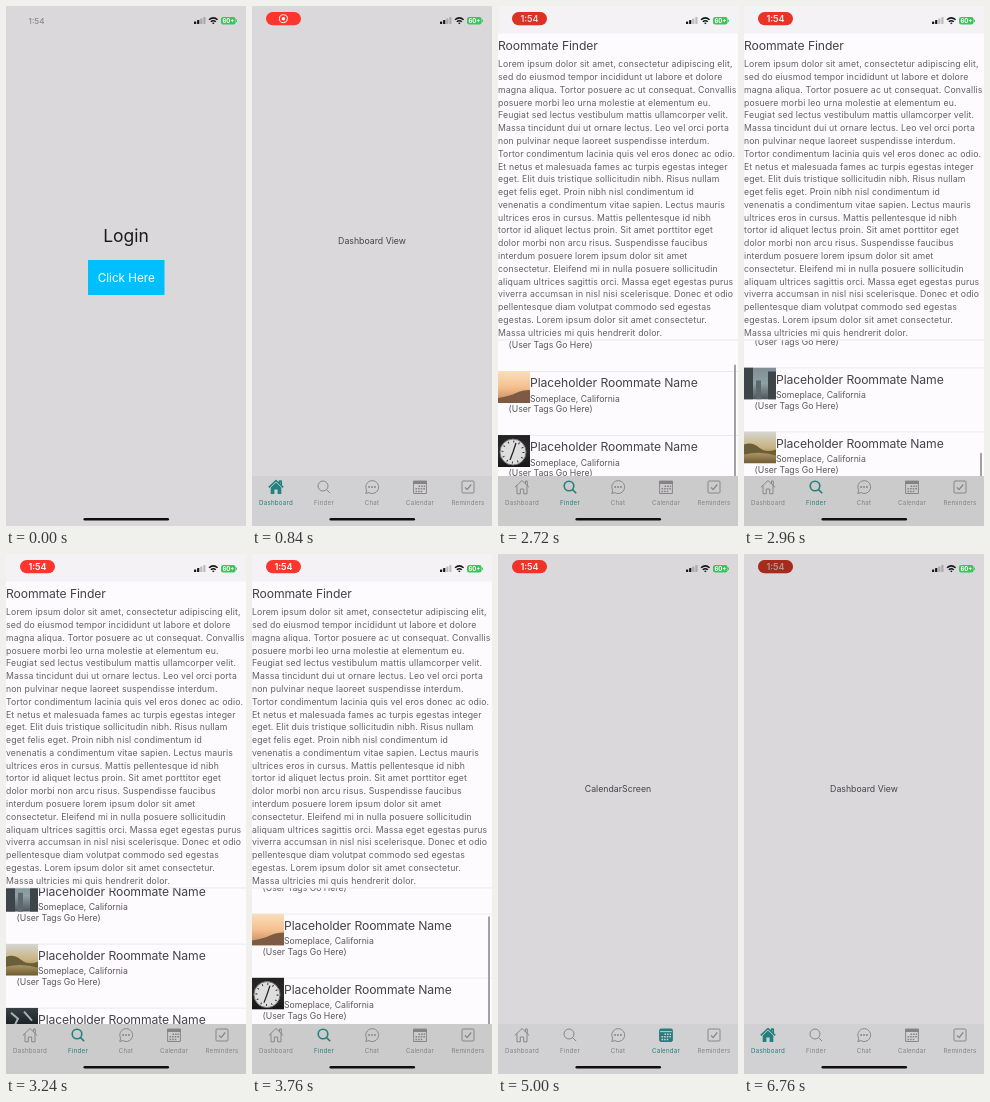
Animation of 240 by 520 pixels, one loop 6800 ms. Source, as an HTML page:

```html
<!DOCTYPE html>
<html lang="en">
<head>
<meta charset="utf-8">
<title>Roommate app</title>
<style>
html, body { margin: 0; width: 100%; height: 100%; overflow: hidden; background: #dad8db; }
svg { display: block; width: 240px; height: 520px; font-family: Inter, Roboto, sans-serif; }
.mid { text-anchor: middle; }
.body { font-size: 8.7px; fill: #59575a; }
.lorem { letter-spacing: .14px; fill: #626063; }
.title { font-size: 12.2px; letter-spacing: -.11px; fill: #454347; }
.view { font-size: 8.75px; fill: #454447; }
.label { font-size: 6.2px; letter-spacing: .22px; stroke: none; fill: currentColor; }
.tab { color: #858386; fill: none; stroke: currentColor; stroke-width: .95; stroke-linejoin: round; }
.tab .solid { fill: currentColor; stroke: none; }
.tab .on { display: none; }
.tab.active { color: #24807e; }
.tab.active .on { display: inline; }
.tab.active .off { display: none; }
</style>
</head>
<body>
<svg viewBox="0 0 240 520">
  <defs>
    <clipPath id="listArea"><rect y="334" width="240" height="136"/></clipPath>
    <clipPath id="thumb"><rect width="32" height="32"/></clipPath>
  </defs>
  <rect id="back" width="240" height="520"/>

  <g id="login">
    <text class="mid" x="120" y="236.3" font-size="17.5" fill="#19181a">Login</text>
    <g id="button">
      <rect x="82" y="254" width="76.5" height="35" fill="#00bfff"/>
      <text class="mid" x="120.3" y="276" font-size="11.7" fill="#fff">Click Here</text>
    </g>
  </g>

  <text id="view" class="mid view" x="120" y="237.7"></text>

  <g id="finder">
    <rect width="240" height="27.5" fill="#f4f2f5"/>
    <text class="title" x="0" y="44">Roommate Finder</text>
    <g id="lorem"></g>
    <g clip-path="url(#listArea)">
      <g id="list"></g>
      <rect id="bar" x="236" width="2" height="150" rx="1" fill="#a3a1a5"/>
    </g>
    <rect y="333.6" width="240" height=".7" fill="#e2dfe4"/>
  </g>

  <g id="tabs"><rect id="tabBack" y="470" width="240" height="50"/></g>

  <text id="clock" class="mid" x="30.5" y="17.5" font-size="8" font-weight="500" fill="#89878a">1:54</text>
  <g id="pill">
    <rect x="14" y="6" width="35" height="13.3" rx="6.6" fill="#fc362c"/>
    <g id="record">
      <circle cx="31.4" cy="12.7" r="4" fill="none" stroke="#fff" stroke-width="1"/>
      <circle cx="31.4" cy="12.7" r="1.8" fill="#fff"/>
    </g>
    <text id="pillTime" class="mid" x="31.5" y="16" font-size="9" font-weight="600" fill="#fff">1:54</text>
    <rect id="shade" x="14" y="6" width="35" height="13.3" rx="6.6" fill="#352008"/>
  </g>
  <g fill="#171618">
    <rect x="188" y="15.4" width="2.2" height="2.6" rx=".5"/>
    <rect x="191.1" y="14" width="2.2" height="4" rx=".5"/>
    <rect x="194.2" y="12.5" width="2.2" height="5.5" rx=".5" opacity=".25"/>
    <rect x="197.3" y="11" width="2.2" height="7" rx=".5" opacity=".25"/>
    <g fill="none" stroke="#171618" stroke-width="1.5">
      <path d="M203 13.8Q207.3 10 211.6 13.8"/>
      <path d="M204.8 15.8Q207.3 13.6 209.8 15.8"/>
    </g>
    <path d="M206 16.9Q207.3 15.9 208.6 16.9L207.3 18.2Z"/>
  </g>
  <rect x="215" y="11" width="14.6" height="7.6" rx="2.3" fill="#35c759"/>
  <rect x="230.1" y="13.4" width=".9" height="2.7" rx=".4" fill="#35c759"/>
  <text class="mid" x="222.4" y="17" font-size="6" font-weight="700" fill="#fff">60+</text>
  <rect x="77.5" y="512" width="85.5" height="2.6" rx="1.3" fill="#100e11"/>
</svg>
<script>
const LOOP = 6800;
const $ = id => document.getElementById(id);
const show = (id, on) => $(id).style.display = on ? "" : "none";
const clamp = x => Math.max(0, Math.min(1, x));
const ramp = (t, from, to) => clamp((t - from) / (to - from));

const lines = `Lorem ipsum dolor sit amet, consectetur adipiscing elit,
sed do eiusmod tempor incididunt ut labore et dolore
magna aliqua. Tortor posuere ac ut consequat. Convallis
posuere morbi leo urna molestie at elementum eu.
Feugiat sed lectus vestibulum mattis ullamcorper velit.
Massa tincidunt dui ut ornare lectus. Leo vel orci porta
non pulvinar neque laoreet suspendisse interdum.
Tortor condimentum lacinia quis vel eros donec ac odio.
Et netus et malesuada fames ac turpis egestas integer
eget. Elit duis tristique sollicitudin nibh. Risus nullam
eget felis eget. Proin nibh nisl condimentum id
venenatis a condimentum vitae sapien. Lectus mauris
ultrices eros in cursus. Mattis pellentesque id nibh
tortor id aliquet lectus proin. Sit amet porttitor eget
dolor morbi non arcu risus. Suspendisse faucibus
interdum posuere lorem ipsum dolor sit amet
consectetur. Eleifend mi in nulla posuere sollicitudin
aliquam ultrices sagittis orci. Massa eget egestas purus
viverra accumsan in nisl nisi scelerisque. Donec et odio
pellentesque diam volutpat commodo sed egestas
egestas. Lorem ipsum dolor sit amet consectetur.
Massa ultricies mi quis hendrerit dolor.`.split("\n");
$("lorem").innerHTML = lines.map((s, i) =>
  `<text class="body lorem" x="0" y="${61.2 + i * 12.79}">${s}</text>`).join("");

// Thumbnails: three gradient colours plus a few flat shapes
const photos = [
  ["#a3abb0", "#c2ab90", "#b8722c", `<path d="M0 15Q16 12 32 15V20H0Z" fill="#6f6a58"/><path d="M4 19h8v5H4zM19 18h6v4h-6z" fill="#7c4a22"/>`],
  ["#f8dfbd", "#f5c08f", "#c08457", `<path d="M0 27Q12 25 18 22T32 19V32H0Z" fill="#7d5a43"/>`],
  ["#222", "#2a2a2a", "#161616", `<circle cx="15" cy="17" r="13" fill="#dedede" stroke="#777"/><circle cx="15" cy="17" r="10.5" fill="none" stroke="#333" stroke-width="2" stroke-dasharray="1 4.5"/><path d="M12 25L15 17L18 8" fill="none" stroke="#222" stroke-width="1.3"/>`],
  ["#7f8d94", "#8fa0a7", "#4d565a", `<path d="M0 0h9v32H0zM24 4h8v28h-8z" fill="#3d4549"/><path d="M12 13h5v19h-5z" fill="#5c686e"/>`],
  ["#d5d6d3", "#c9b37f", "#6d5a30", `<path d="M0 13Q8 10 15 16T32 18V24Q16 19 0 23Z" fill="#6b5e38"/>`],
  ["#3a4146", "#1d2225", "#131617", `<path d="M5 5l7 6-4 8M18 4l8 9" stroke="#a9b2b6" stroke-width="2" fill="none"/>`]
];
$("list").innerHTML = Array.from({ length: 8 }, (_, i) => {
  const [top, mid, low, shapes] = photos[i % photos.length];
  return `<g transform="translate(0 ${334.7 + i * 64})">
    <linearGradient id="sky${i}" x2="0" y2="1"><stop stop-color="${top}"/>
      <stop offset=".5" stop-color="${mid}"/><stop offset="1" stop-color="${low}"/></linearGradient>
    <rect width="240" height=".8" fill="#e8e5ea"/>
    <g clip-path="url(#thumb)"><rect width="32" height="32" fill="url(#sky${i})"/>${shapes}</g>
    <text class="title" x="32" y="16.2">Placeholder Roommate Name</text>
    <text class="body" x="32" y="30.8">Someplace, California</text>
    <text class="body" x="10.5" y="41.4">(User Tags Go Here)</text></g>`;
}).join("");

const dots = (color, r) => [-2.9, 0, 2.9].map(x => `<circle cx="${x}" r="${r}" fill="${color}" stroke="none"/>`).join("");
const days = color => `<path d="M-1.5-.8H5M-4.5 1.8H5M-4.5 4.4H3" stroke="${color}" stroke-width="1.5" stroke-dasharray="1.6 1"/>`;
const roof = `<path d="M-7.2.4L0-6.5L7.2.4M3.5-3.2V-6H5.3V-1.6"/>`;
const bubble = "M-6.2 6.5L-5.3 3.3A6.4 6.4 0 1 1-3 5.6Z";
const box = `x="-6" y="-6" width="12" height="12" rx="1"`;
const check = color => `<path d="M-3 .4L-.9 2.6L3.2-2.5" stroke="${color}" stroke-width="1.2"/>`;
const pair = (off, on) => `<g class="off">${off}</g><g class="on">${on}</g>`;
const tabs = [
  ["Dashboard", pair(`${roof}<path d="M-5-1.6V6.8H-1.7V2H1.7V6.8H5V-1.6"/>`,
    `<g stroke-width="1.5">${roof}</g><path class="solid" d="M-5.3.6L0-4.5L5.3.6V7H1.6V2.6H-1.6V7H-5.3Z"/>`)],
  ["Finder", pair(`<circle cx="-1" cy="-1" r="5"/><path d="M2.6 2.6L6.2 6.2"/>`,
    `<g stroke-width="1.6"><circle cx="-1" cy="-1" r="4.8"/><path d="M2.6 2.6L6.2 6.2"/></g>`)],
  ["Chat", pair(`<path d="${bubble}"/>${dots("currentColor", .95)}`,
    `<path d="${bubble}" fill="currentColor"/>${dots("#cfced0", .95)}`)],
  ["Calendar", pair(`<rect x="-6.4" y="-5.8" width="12.8" height="12.3"/><path class="solid" d="M-6.8-6.2H6.8V-3H-6.8Z"/>${days("currentColor")}`,
    `<rect x="-6.4" y="-6" width="12.8" height="12.5" rx="1.3" fill="currentColor"/><path d="M-5.8-3.4H5.8" stroke="#cfced0"/>${days("#cfced0")}`)],
  ["Reminders", pair(`<rect ${box}/>${check("currentColor")}`,
    `<rect ${box} fill="currentColor"/>${check("#cfced0")}`)]
];
$("tabs").innerHTML += tabs.map(([name, icon], i) =>
  `<g class="tab" transform="translate(${24 + i * 48} 481)">${icon}<text class="label mid" y="17.9">${name}</text></g>`).join("");
const tabNodes = [...document.querySelectorAll(".tab")];

const views = ["Dashboard View", "", "ChatScreen", "CalendarScreen", "RemindersScreen"];
// [start time, tab]; -1 is the login screen
const route = [[0, -1], [760, 0], [1800, 1], [4240, 2], [4760, 3], [5480, 4], [6160, 0]];
const scrollKeys = [[2560, 0], [2640, 10], [2720, 33], [2840, 110], [2960, 165], [3100, 193], [3240, 201],
  [3440, 201], [3560, 150], [3700, 60], [3840, 12], [3960, 0]];

function scrollAt(t) {
  const next = scrollKeys.findIndex(k => k[0] > t);
  if (next < 1) return 0;
  const [t0, y0] = scrollKeys[next - 1], [t1, y1] = scrollKeys[next];
  return y0 + (y1 - y0) * ramp(t, t0, t1);
}

function draw(now) {
  const t = now % LOOP;
  const tab = route.filter(r => r[0] <= t).pop()[1];
  const finder = tab === 1;
  $("back").setAttribute("fill", finder ? "#fefbff" : "#dad8db");
  $("tabBack").setAttribute("fill", finder ? "#cbcbcb" : "#d1d0d2");
  show("login", tab < 0);
  show("tabs", tab >= 0);
  show("finder", finder);
  $("view").textContent = views[tab] || "";
  tabNodes.forEach((node, i) => node.classList.toggle("active", i === tab));
  $("button").setAttribute("opacity", 1 - .8 * ramp(t, 620, 720));

  const y = scrollAt(t);
  $("list").setAttribute("transform", `translate(0 ${-y})`);
  $("bar").setAttribute("y", 336 + y * .67);
  $("bar").setAttribute("opacity", t > 2560 ? 1 : 0);

  const pill = ramp(t, 120, 320);
  $("pill").setAttribute("opacity", pill);
  $("clock").setAttribute("opacity", 1 - pill);
  const time = ramp(t, 1400, 1600);
  $("record").setAttribute("opacity", 1 - time);
  $("pillTime").setAttribute("opacity", time);
  // The pill dims briefly about every two seconds, and strongly at the end
  const pulse = clamp(Math.cos((t - 2720) / 2020 * 2 * Math.PI)) ** 2;
  $("shade").setAttribute("opacity", .16 * pulse * time + .28 * ramp(t, 6520, 6760));
  requestAnimationFrame(draw);
}
draw(performance.now());
</script>
</body>
</html>
```
